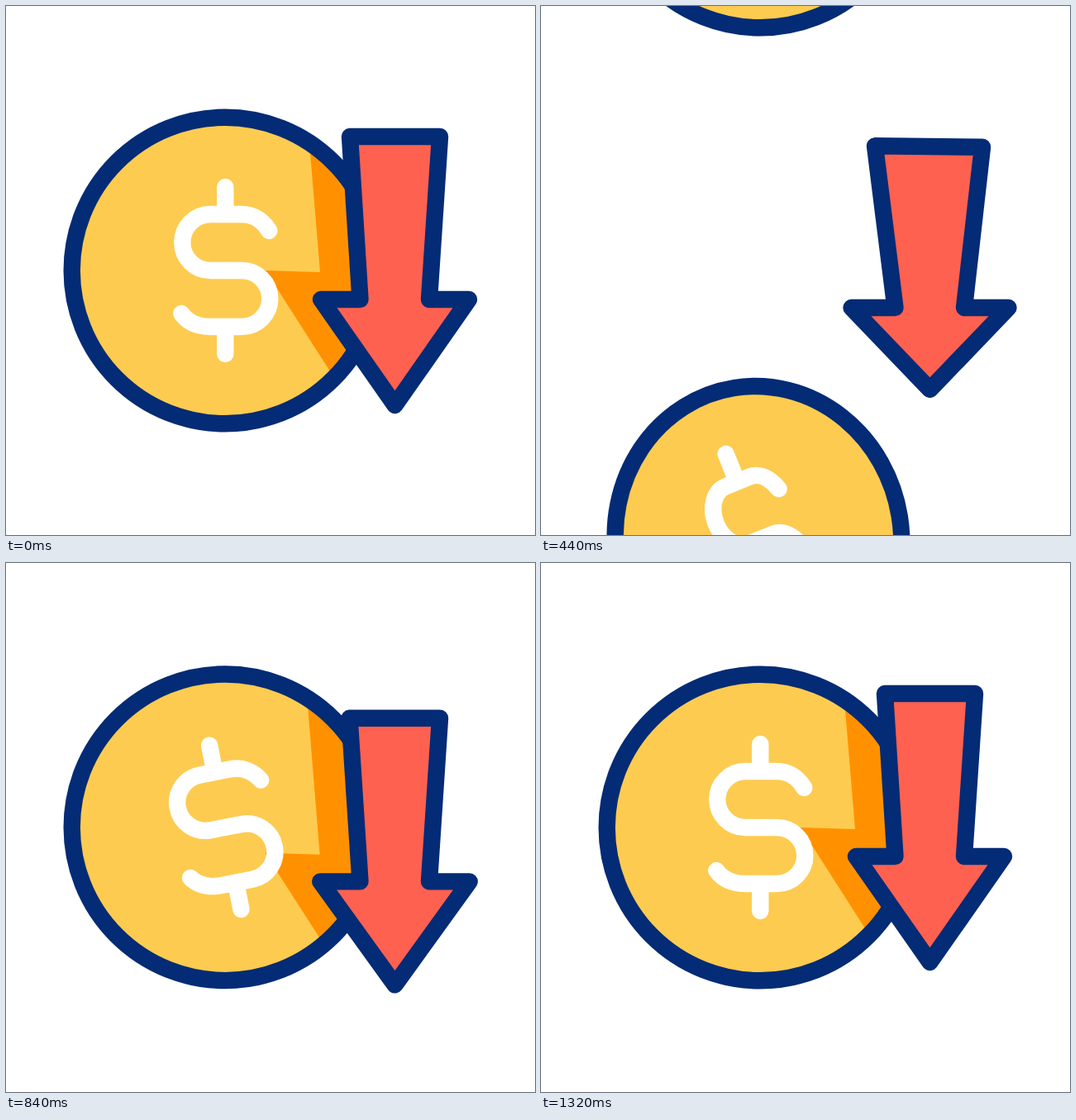
An HTML page for the animation above (1480 ms loop, 640 px wide and 640 px high).

```html
<!DOCTYPE html>
<html lang="en">
<head>
<meta charset="utf-8">
<title>Falling coin</title>
<style>
  html, body { margin: 0; width: 100%; height: 100%; overflow: hidden; background: #fff; }
  svg { display: block; width: 100%; height: 100%; }
  .line { stroke: #042b75; stroke-width: 20.4; stroke-linecap: round; stroke-linejoin: round; }
  .sign { fill: none; stroke: #fff; stroke-width: 20.4; stroke-linecap: round; stroke-linejoin: round; }
</style>
</head>
<body>
<svg id="stage" viewBox="0 0 640 640"></svg>
<script>
const LOOP = 1480, STEP = 40, LAST = 1320;
const stage = document.getElementById('stage');

function add(parent, tag, attrs) {
  const el = document.createElementNS('http://www.w3.org/2000/svg', tag);
  set(el, attrs);
  return parent.appendChild(el);
}

function set(el, attrs) {
  for (const k in attrs) el.setAttribute(k, attrs[k]);
}

// Smooth curve through the keys that never overshoots them.
function curve(times, values) {
  const n = times.length;
  const slope = i => (values[i + 1] - values[i]) / (times[i + 1] - times[i]);
  const tangent = i => {
    if (i === 0 || i === n - 1) return 0;
    const a = slope(i - 1), b = slope(i);
    return a * b <= 0 ? 0 : 2 * a * b / (a + b);
  };
  return t => {
    if (t <= times[0]) return values[0];
    if (t >= times[n - 1]) return values[n - 1];
    let i = 0;
    while (t >= times[i + 1]) i++;
    const h = times[i + 1] - times[i], u = (t - times[i]) / h, v = 1 - u;
    return v * v * (1 + 2 * u) * values[i] + u * u * (3 - 2 * u) * values[i + 1]
      + h * u * v * (v * tangent(i) - u * tangent(i + 1));
  };
}

const beats = [0, 280, 440, 500, 560, 720, 1000, LAST];
const arrowMove = {
  y: curve(beats, [355, 468, 365, 356, 361, 397, 364, 355]),
  topW: curve(beats, [54.5, 50.5, 65, 65.5, 64.5, 56, 54, 54.5]),
  headW: curve(beats, [89.5, 76, 95, 96, 96, 90.5, 90, 89.5]),
  tip: curve(beats, [128, 139, 99, 98.5, 100, 122, 127, 128]),
  rise: curve(beats, [197, 205, 195, 194, 194, 197, 198, 197]),
  lean: curve(beats, [0, -2, -1.5, -1, -1, -0.5, 0, 0])
};
const shadeMove = {
  neck: curve(beats, [380, 392, 377, 376, 375.5, 379, 380, 380]),
  head: curve(beats, [314, 327, 313, 313, 313, 313, 314, 314]),
  top: curve(beats, [360, 338, 360, 360, 360, 360, 360, 360]),
  lift: curve(beats, [33, 39.5, 33, 33, 33, 32.5, 33, 33])
};

const leaving = {
  y: curve([0, 140, 280, 440, 560, 700], [320, 348, 447, 645, 782, 930]),
  x: curve([0, 280, 440, 560], [265, 263, 263, 261]),
  rx: curve([0, 220, 280, 440, 560], [185.3, 167, 168, 173, 180]),
  tilt: curve([0, 280, 440, 560], [0, -9, -9, -7]),
  spin: curve([0, 280, 440, 600], [0, -9.3, -22, -32]),
  stretch: curve([0, 220], [0, 1])
};
const arriving = {
  y: curve([320, 440, 560, 720, 830, 1000, 1040, 1120, LAST],
    [-340, -159, 10, 238, 320, 296, 294, 301, 320]),
  x: () => 265,
  rx: () => 185.3,
  tilt: () => 0,
  spin: curve([400, 560, 720, 750, 1000, LAST], [26, 10.8, -13.4, -14.5, -1.7, 0]),
  stretch: () => 0
};

function makeCoin(move, id) {
  const clip = add(add(stage, 'clipPath', { id }), 'ellipse', { ry: 185.3 });
  const face = add(stage, 'ellipse', { ry: 185.3, fill: '#fdcb50' });
  const shade = add(stage, 'polygon', { fill: '#ff9100', 'clip-path': `url(#${id})` });
  const sign = add(stage, 'path', { class: 'sign' });
  const rim = add(stage, 'ellipse', { ry: 185.3, fill: 'none', class: 'line' });
  return { move, shade, sign, rounds: [clip, face, rim] };
}

// Dollar sign around the origin; stretching makes it taller and narrower.
function signPath(k) {
  const sx = 1 - 0.18 * k, sy = 1 + 0.1 * k;
  const p = (x, y) => `${(x * sx).toFixed(2)} ${(y * sy).toFixed(2)}`;
  const hook = (x, y) => `${(x * sx).toFixed(2)} ${y}`;
  const arc = (sweep, x, y) => `A${p(34, 34)} 0 0 ${sweep} ${p(x, y)}`;
  return `M${p(0, -101)}L${p(0, -68)}M${p(0, 68)}L${p(0, 101)}`
    + `M${hook(53, -48)}C${p(46, -60)} ${p(34, -68)} ${p(20, -68)}L${p(-18, -68)}`
    + arc(0, -18, 0) + `L${p(20, 0)}` + arc(1, 20, 68)
    + `L${p(-18, 68)}C${p(-34, 68)} ${p(-46, 62)} ${hook(-53, 52)}`;
}

const coins = [makeCoin(leaving, 'clipA'), makeCoin(arriving, 'clipB')];
const arrow = add(stage, 'polygon', { fill: '#ff6150', class: 'line' });

function sample(move, t) {
  const out = {};
  for (const k in move) out[k] = move[k](t);
  return out;
}

const join = pts => pts.map(p => p.map(v => v.toFixed(2)).join()).join(' ');

function draw(t) {
  const a = sample(arrowMove, t), s = sample(shadeMove, t);
  const cx = 470.5, top = a.y - a.rise;
  set(arrow, { points: join([
    [cx + a.lean - a.topW, top + a.lean / 2], [cx + a.lean + a.topW, top - a.lean / 2],
    [512, a.y], [cx + a.headW, a.y], [cx, a.y + a.tip], [cx - a.headW, a.y], [428.5, a.y]
  ]) });

  const neckY = a.y - s.lift, headY = neckY - 2, shadeTop = top - 77;
  const shadow = join([
    [s.top, shadeTop], [560, shadeTop], [560, neckY],
    [470, headY + 244], [s.head, headY], [s.neck, neckY]
  ]);

  for (const coin of coins) {
    const c = sample(coin.move, t);
    const place = `translate(${c.x} ${c.y}) rotate(${c.tilt})`;
    for (const el of coin.rounds) set(el, { rx: c.rx, transform: place });
    set(coin.shade, { points: shadow });
    set(coin.sign, {
      d: signPath(c.stretch),
      transform: `translate(265.3 ${c.y}) rotate(${c.spin})`
    });
  }
}

const start = performance.now();
function tick() {
  const t = (performance.now() - start) % LOOP;
  draw(Math.min(LAST, Math.floor(t / STEP) * STEP));
  requestAnimationFrame(tick);
}
tick();
</script>
</body>
</html>
```
